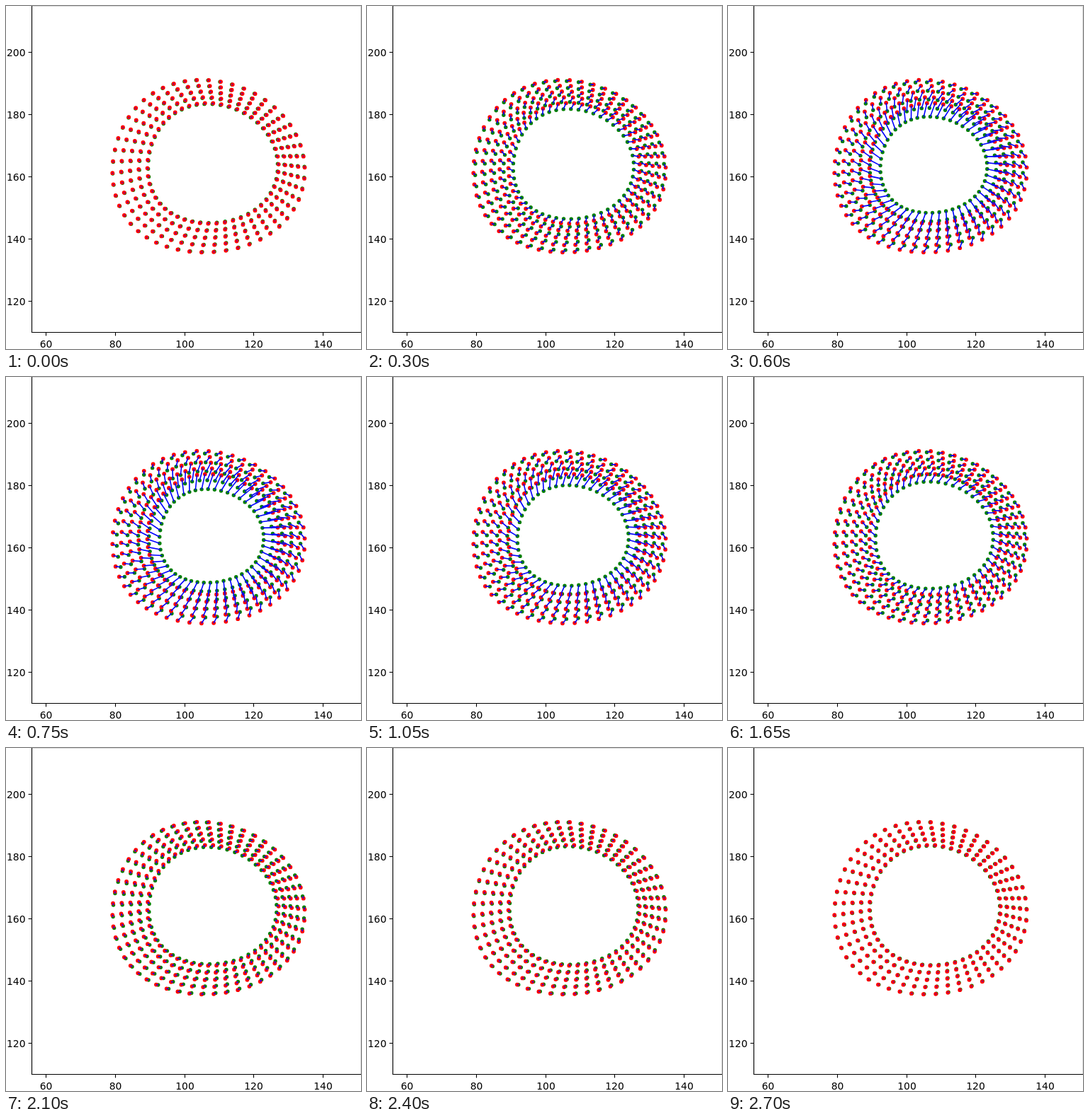
An HTML page with a canvas that plays this animation: 501x485 px, repeating every 2850 ms.

```html
<!DOCTYPE html>
<html lang="en">
<head>
<meta charset="utf-8">
<title>Ring displacement plot</title>
<style>
html, body { margin: 0; width: 100%; height: 100%; overflow: hidden; background: #fff; }
svg, canvas { position: absolute; left: 0; top: 0; width: 501px; height: 485px; }
text { font: 13.89px "DejaVu Sans", sans-serif; fill: #000; }
line { stroke: #000; stroke-width: 1.11; }
.faint { stroke: #ddd; stroke-width: 1; }
</style>
</head>
<body>
<svg id="axes" viewBox="0 0 501 485">
  <line class="faint" x1="37" y1="0.5" x2="501" y2="0.5"/>
  <line class="faint" x1="500.5" y1="0" x2="500.5" y2="461"/>
  <line x1="36.5" y1="0" x2="36.5" y2="462"/>
  <line x1="36" y1="461.5" x2="501" y2="461.5"/>
</svg>
<canvas id="plot" width="501" height="485"></canvas>
<script>
const SPOKES = 50, RINGS = 5, STEP = 150, LOOP = 2850;
const { sin, cos, PI } = Math;

// Key points over time: [step, amount], eased in between.
const squeezeKeys = [[0, .06], [5, 1], [8, .65], [11, .5], [14, .13], [18, .05]];
const twistKeys = [[0, .18], [3, .95], [11, 1], [14, .5], [18, .15]];

const mix = (a, b, s) => a + (b - a) * s;

function ease(keys, t) {
  const i = keys.findIndex(k => k[0] >= t) || 1;
  const [t0, a] = keys[i - 1], [t1, b] = keys[i];
  const f = (t - t0) / (t1 - t0);
  return mix(a, b, f * f * (3 - 2 * f));
}

// Slightly uneven ellipses, from the outer wall (s = 0) to the inner (s = 1).
const points = [];
for (let i = 0; i < SPOKES; i++) {
  const a = 2 * PI * (i - .7) / SPOKES;
  const dx = sin(a) - .018 * cos(2 * a) - .005 * sin(2 * a);
  const dy = -cos(a) - .023 * cos(2 * a) + .013 * sin(2 * a) + .014 * cos(3 * a - .42);
  for (let r = 0; r < RINGS; r++) {
    const s = r / (RINGS - 1);
    const x = mix(283.5, 290.5, s) + mix(135.7, 92.6, s) * dx;
    const y = mix(229.3, 224.5, s) + mix(123.4, 86.3, s) * dy;
    points.push({ x, y, a, s });
  }
}

// Each point is drawn inwards, turned counterclockwise and carried along.
function move({ x, y, a, s }, squeeze, twist) {
  const pull = mix(6, 19.2, s) * squeeze, turn = mix(5.5, 4.6, s) * twist;
  return {
    x: x - pull * sin(a) - turn * cos(a) + mix(0, -2, s) * squeeze,
    y: y + pull * cos(a) - turn * sin(a) + mix(-2.5, 2, s) * squeeze
  };
}

const ctx = document.getElementById("plot").getContext("2d");

function dots(list, radius, color) {
  ctx.fillStyle = color;
  ctx.beginPath();
  for (const { x, y } of list) {
    ctx.moveTo(x + radius, y);
    ctx.arc(x, y, radius, 0, 2 * PI);
  }
  ctx.fill();
}

function draw(step) {
  const squeeze = ease(squeezeKeys, step), twist = ease(twistKeys, step);
  const moved = points.map(p => move(p, squeeze, twist));
  ctx.clearRect(0, 0, 501, 485);
  dots(moved, 2.7, "#008000");
  dots(points, 2.9, "#f00");
  ctx.strokeStyle = "#00f";
  ctx.lineWidth = 1.6;
  ctx.beginPath();
  points.forEach((p, i) => {
    ctx.moveTo(p.x, p.y);
    ctx.lineTo(moved[i].x, moved[i].y);
  });
  ctx.stroke();
}

function add(tag, attrs, label) {
  const el = document.createElementNS("http://www.w3.org/2000/svg", tag);
  for (const key in attrs) el.setAttribute(key, attrs[key]);
  if (label) el.textContent = label;
  document.getElementById("axes").append(el);
}

for (let v = 60; v <= 140; v += 20) {
  const x = Math.round(56 + (v - 60) * 4.888) + .5;
  add("line", { x1: x, x2: x, y1: 461.5, y2: 466.4 });
  add("text", { x, y: 483, "text-anchor": "middle" }, v);
}
for (let v = 120; v <= 200; v += 20) {
  const y = Math.round(65.4 + (200 - v) * 4.396) + .5;
  add("line", { x1: 31.6, x2: 36.5, y1: y, y2: y });
  add("text", { x: 27.5, y: y + 5.5, "text-anchor": "end" }, v);
}

let shown = -1;
function tick() {
  const step = Math.floor(performance.now() % LOOP / STEP);
  if (step !== shown) draw(shown = step);
  requestAnimationFrame(tick);
}
tick();
</script>
</body>
</html>
```
